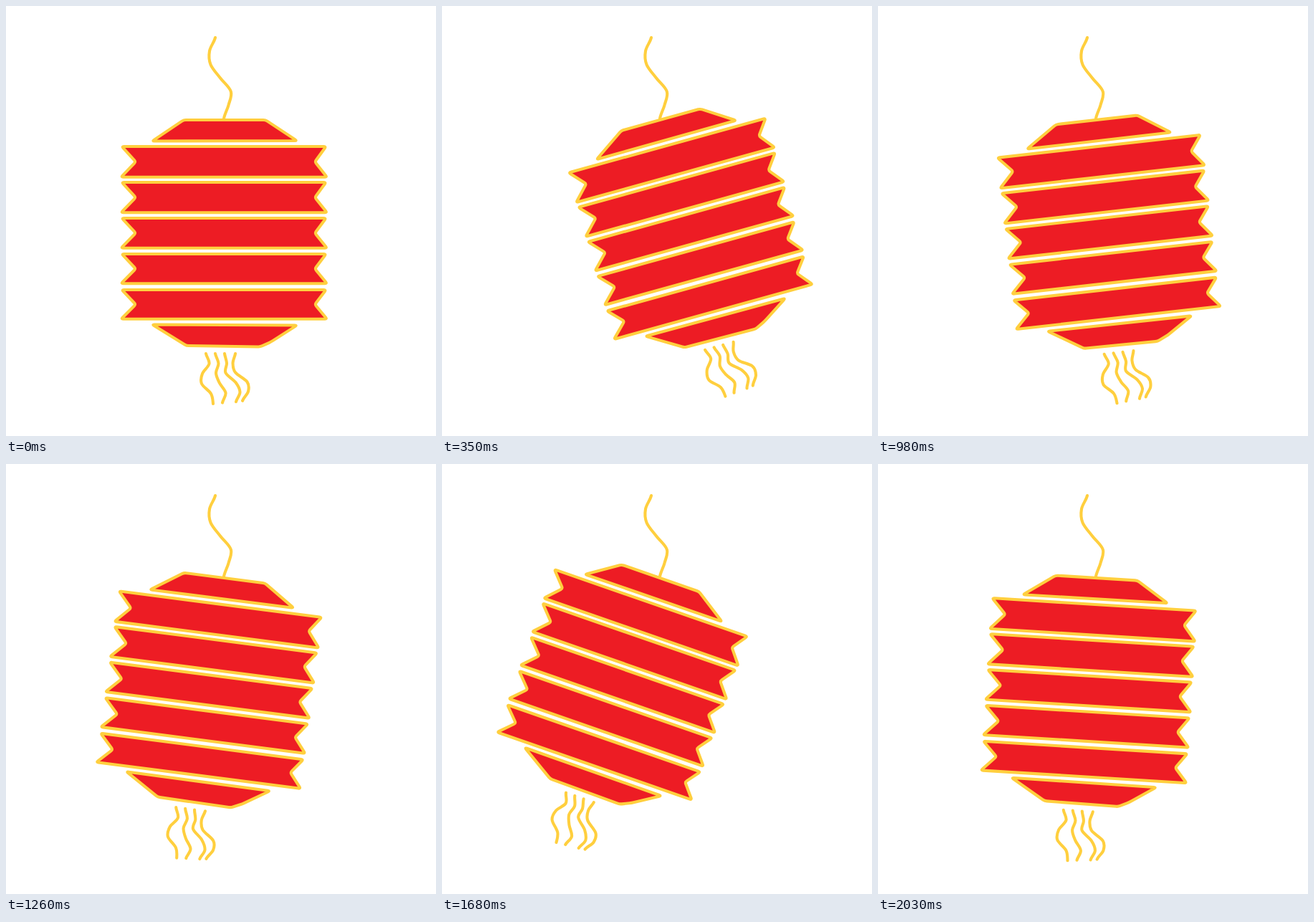
Recreate the animation shown at these times as an HTML page. Size 600 by 600 pixels, loop 2100 ms.

```html
<!DOCTYPE html>
<html lang="en">
<head>
<meta charset="utf-8">
<title>Swinging lantern</title>
<style>
  html, body { margin: 0; width: 100%; height: 100%; overflow: hidden; background: #fff; }
  svg { display: block; width: 100%; height: 100%; }
</style>
</head>
<body>
<svg viewBox="0 0 600 600" fill="none" stroke="#ffcf3e" stroke-width="4.1" stroke-linecap="round" stroke-linejoin="round">
  <g id="lantern"></g>
  <path id="cord"/>
</svg>
<script>
const STEP = 70, FRAMES = 30, SWING = 20;
const lantern = document.getElementById('lantern');

// Closed polygon with softened corners
function softPath(points, r = 3) {
  const toward = ([x, y], [u, v]) => {
    const k = r / Math.hypot(u - x, v - y);
    return [x + (u - x) * k, y + (v - y) * k];
  };
  return points.map((p, i) => {
    const prev = points.at(i - 1), next = points[(i + 1) % points.length];
    return `${i ? 'L' : 'M'}${toward(p, prev)}Q${p} ${toward(p, next)}`;
  }).join('') + 'Z';
}

// Smooth hanging thread through xs at even heights
function thread(xs, top, bottom) {
  const h = (bottom - top) / (xs.length - 1);
  const slope = i => ((xs[i + 1] ?? xs[i]) - (xs[i - 1] ?? xs[i])) / 6;
  return `M${xs[0]} ${top}` + xs.slice(1).map((x, i) => {
    const y = top + i * h;
    return `C${xs[i] + slope(i)} ${y + h / 3} ${x - slope(i + 1)} ${y + h * 2 / 3} ${x} ${y + h}`;
  }).join('');
}

function ribbon(i) {
  const top = 196 + 50 * i, bottom = 238.8 + 49.5 * i, mid = (top + bottom) / 2;
  return [[161.5, top], [446.5, top], [431, mid], [448, bottom], [160.5, bottom], [181, mid]];
}

const caps = [
  [[204, 188.5], [248, 159], [362, 159], [406, 188]],
  [[204, 444.5], [406, 445.5], [370, 468.5], [355, 475.5], [252, 474]]
];
const tassels = [
  [279, 283.5, 274, 273, 286, 289],
  [292, 296.5, 293, 298, 306.5, 302],
  [305, 308, 306.5, 320.5, 326.5, 321],
  [320, 316.5, 320, 336.5, 338, 330]
];

const ribbons = Array.from({ length: 5 }, (_, i) => ribbon(i));
lantern.innerHTML =
  [...caps, ...ribbons].map(s => `<path fill="#ed1c24" d="${softPath(s)}"/>`).join('') +
  tassels.map((xs, i) => `<path d="${thread(xs, 485, 555 - 1.4 * i)}"/>`).join('');
document.getElementById('cord')
  .setAttribute('d', thread([292, 284, 285.5, 299, 313.8, 310.5, 304], 44, 157));

// Linear start, soft stop: cubic-bezier(1/6, 1/6, 2/3, 1)
function ease(x) {
  const bezier = (u, a, b) => 3 * u * (1 - u) * ((1 - u) * a + u * b) + u ** 3;
  let lo = 0, hi = 1;
  for (let i = 0; i < 24; i++) {
    const mid = (lo + hi) / 2;
    if (bezier(mid, 1 / 6, 2 / 3) < x) lo = mid; else hi = mid;
  }
  return bezier(lo, 1 / 6, 1);
}

// Out to the right and back in 16 steps, then to the left and back in 14
function angle(n) {
  return n < 16
    ? -SWING * ease(1 - Math.abs(n - 8) / 8)
    : SWING * ease(1 - Math.abs(n - 23) / 7);
}

function draw() {
  const n = Math.floor(performance.now() / STEP) % FRAMES;
  lantern.setAttribute('transform', `rotate(${angle(n)} 304 158)`);
  requestAnimationFrame(draw);
}
draw();
</script>
</body>
</html>
```
